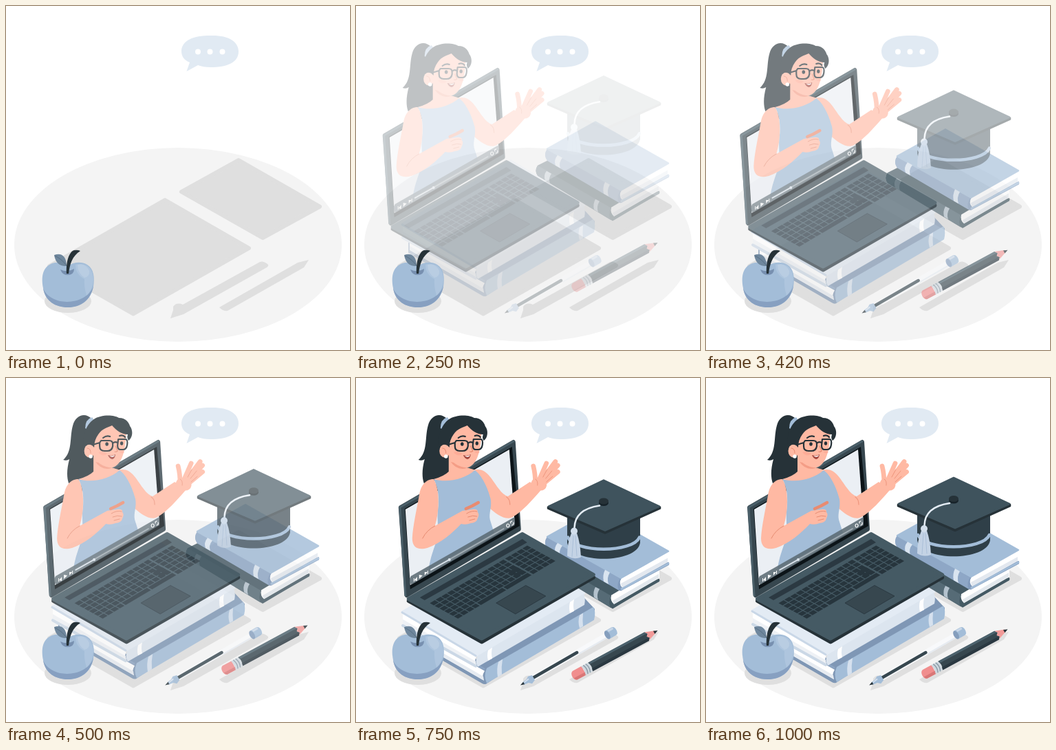
An HTML page that plays this animation: 500 px wide and 500 px high, repeating every 1.04 s.

```html
<!DOCTYPE html>
<html lang="en">
<head>
<meta charset="utf-8">
<title>Online lesson</title>
<style>
  :root { --p: 0; --shift: calc((var(--p) - 1) * 30px); }
  html, body { margin: 0; width: 100%; height: 100%; overflow: hidden; background: #fff; }
  svg { display: block; width: 100vw; height: 100vh; }
  .fromLeft, .fromTop { opacity: var(--p); }
  .fromLeft { transform: translateX(var(--shift)); }
  .fromTop { transform: translateY(var(--shift)); }
  /* solid shape with softened corners */
  .r { fill: currentColor; stroke: currentColor; stroke-width: 6; stroke-linejoin: round; }
  .thin { stroke-width: 2.5; }
  .line { fill: none; stroke-linecap: round; stroke-linejoin: round; }
</style>
</head>
<body>
<svg viewBox="0 0 500 500">
  <ellipse cx="250" cy="347" rx="238" ry="141" fill="#f4f4f4"/>

  <g id="shadows" color="#dfdfdf" fill="#dfdfdf">
    <path class="r" d="M231 282L353 352L185 447.500L63 378Z"/>
    <path class="r" d="M338 224L456 291.500L373 337L255 270Z"/>
    <path d="M239 454L243 442L243 437Q248 430 257 434L369 372Q374 370 380 375Q383 377 379 380L258 448Z"/>
    <path d="M310 438L424 373L440 369L433 380L322 443Q315 444 310 438Z"/>
    <ellipse cx="90" cy="429" rx="34" ry="17"/>
  </g>

  <g id="bubble">
    <path fill="#e1eaf3" d="M297 43C322 42 338 51 338 66C338 82 322 89 297 89C290 89 284 88 279 86L262.500 95L267 82C258 78 255 73 255 65C256 50 272 43 297 43Z"/>
    <path class="line" stroke="#fff" stroke-width="8" d="M279 66.500h0M296.500 66.500h0M314.500 66.500h0"/>
  </g>

  <g id="rightBooks" class="fromTop">
    <!-- lower book -->
    <path fill="#455a64" d="M264 253Q259 261 264 268L370 332Q373 334 376 331L441 294V290L386 300L290 240Z"/>
    <path fill="#fff" d="M371 314L386 305L441 274V289L375 327Q369 322 371 314Z"/>
    <path fill="#e3e8ed" d="M373 322L440 283V289L375 327Z"/>
    <path fill="#566b76" d="M264 253L371 315Q366 323 370 332L264 268Q259 261 264 253Z"/>
    <path fill="#b4c2cd" d="M277 261L284 265Q279 272 282 279L275 275Q272 267 277 261ZM348 302L354 305Q349 313 352 321L346 317Q344 309 348 302Z"/>
    <path class="line" stroke="#455a64" stroke-width="3" d="M373 332L440 292"/>
    <!-- upper book -->
    <path fill="#819abb" d="M278 229Q272 237 278 246L381 306Q384 309 388 306L455 270V266L400 270Z"/>
    <path fill="#fff" d="M386 289L453 252V266L387 303Q381 297 386 289Z"/>
    <path fill="#e3e8ef" d="M385 297L453 260V266L387 303Z"/>
    <path fill="#8ea7c6" d="M278 229L384 290Q378 298 382 307L278 246Q272 238 278 229Z"/>
    <path class="r thin" color="#a3bdd8" d="M278 229L348 190L454 250L385 289Z"/>
    <path fill="#d9e4f0" d="M293 238L300 242Q294 249 297 257L290 253Q287 245 293 238ZM362 277L369 281Q364 289 367 298L360 294Q358 285 362 277Z"/>
    <path class="line" stroke="#a3bdd8" stroke-width="3" d="M386 305L454 268"/>

    <g id="cap" class="fromTop">
      <path fill="#2f3f48" d="M307 195V236C312 267 408 267 413 236V195Z"/>
      <path class="line" stroke="#a3bdd8" stroke-width="4.500" d="M308 228C318 251 402 251 412 228" stroke-linecap="butt"/>
      <path class="r thin" color="#263238" d="M279 184L360 146L442 184V186L362 222L279 186Z"/>
      <path class="r thin" color="#3f535d" d="M280 183L360 145L441 183L362 218Z"/>
      <ellipse cx="360" cy="178" rx="7" ry="4.500" fill="#17232a"/>
      <ellipse cx="360" cy="175.500" rx="7" ry="4.500" fill="#263238"/>
      <path class="line" stroke="#e5edf5" stroke-width="2.500" d="M354 182C334 185 318 194 317.500 214"/>
      <path fill="#c4d3e5" d="M313 222Q307 236 307 255Q316 261 327 257Q326 236 321 222Z"/>
      <path class="line" stroke="#aabfd8" d="M316 226L314 256M319 226L321 255"/>
      <circle cx="317" cy="219" r="5" fill="#d3dfec"/>
    </g>
  </g>

  <g id="leftBooks" class="fromTop">
    <!-- lower book -->
    <path fill="#7f97b5" d="M76 356L177 408L332 318L347 334V340L189 443Q186 444 183 442L76 380Z"/>
    <path fill="#fff" d="M78 363L187 424Q182 432 186 438L78 376Z"/>
    <path fill="#e6ebf1" d="M78 370L185 432L186 438L78 376Z"/>
    <path fill="#a3bdd8" d="M190 420L345 331Q349 338 346 350L190 442Q185 431 190 420Z"/>
    <path fill="#d6e1ee" d="M207 411L213 407Q211 418 212 429L206 433Q204 421 207 411ZM325 343L330 340Q329 350 330 359L325 362Q322 352 325 343Z"/>
    <path class="line" stroke="#8ba3c1" stroke-width="3" d="M78 364L186 421"/>
    <!-- upper book -->
    <path fill="#fff" d="M68 338L176 401Q171 409 175 416L68 356Z"/>
    <path fill="#eef1f5" d="M68 349L174 410L175 416L68 356Z"/>
    <path class="line" stroke="#cbd8e6" stroke-width="4" d="M68 358L174 417"/>
    <path class="r thin" color="#e3ebf4" d="M67 338L225 246L332 311L177 402Z"/>
    <path fill="#dce5ef" d="M177 402L331 312Q334 319 332 328L177 418Q172 410 177 402Z"/>
    <path fill="#fff" d="M192 394L198 390Q196 399 198 406L192 409Q190 402 192 394ZM311 324L317 320Q315 329 317 337L311 340Q309 332 311 324Z"/>
    <path class="line" stroke="#c9d7e7" stroke-width="3" d="M67 339L174 402"/>
  </g>

  <g id="laptop" class="fromLeft">
    <!-- base -->
    <path class="r" color="#263238" d="M75 324L238 232L343 290L181 383.500Z"/>
    <path class="r" color="#455a64" d="M75 321L240 227L343 286L181 378.500Z"/>
    <path fill="#2b3942" d="M91 319L240 234L247 239L98 323Z"/>
    <path fill="#37474f" stroke="#2b3942" d="M202 327L245 301.500L274 317L230 343Z"/>
    <g id="keys" transform="matrix(.835 -.494 .7 .383 105 327)" fill="none" stroke="#27353d" stroke-width="8.400" stroke-dasharray="8.600 1.400">
      <path d="M0 5H128M0 15H128M0 25H128M0 35H128M0 45H128M0 55H38"/>
      <path d="M131 5H170M131 15H170M131 25H170M131 35H170M131 45H170M131 55H170"/>
      <path d="M40 55H84M86 55H128M113 33H128M113 43H128" stroke-dasharray="none"/>
    </g>

    <!-- screen -->
    <path class="r" color="#37474f" d="M63 188L227 93L235 220L72 316Z"/>
    <path class="line" stroke="#4b606a" stroke-width="3" d="M70 316L62 188L227 92"/>
    <path fill="#0c1418" d="M69 190L225 100L236 215L77 307Z"/>
    <path fill="#ebeff4" d="M70 191L221 104L229 212L77 301Z"/>

    <!-- teacher -->
    <g id="teacher">
      <path fill="#263238" d="M131 60C121 49 107 54 103 69C98 86 103 107 89 119Q94 121 98 118C94 133 94 144 97 153L134 143V100Q134 76 131 60Z"/>
      <path fill="#a3bdd8" d="M121 73Q121 60 131 57L134 61Q126 66 126 76Z"/>
      <path fill="#ffb9a3" d="M133 108L133 136Q126 143 111 147Q124 158 146 152Q164 147 172 134L159 130V118Z"/>
      <path fill="#f49d86" d="M136 122Q145 135 159 131V127Z"/>
      <path fill="#ffb9a3" d="M168 134C187 129 193 144 205 160Q212 170 219 172L251 151L267 163C254 178 240 194 226 202C216 208 202 198 190 187Z"/>
      <path class="line" stroke="#ee967d" stroke-width="1.200" d="M217 173Q222 176 222 184"/>
      <g class="line" stroke="#ffb9a3" stroke-width="6.800">
        <path d="M259 154Q259 140 256 128M264 149L275 124M266 151L288 121.500M268 153L291.500 127M268 156L291.500 136.500"/>
        <path d="M261 154L267 155" stroke-width="17"/>
      </g>
      <path class="line" stroke="#ee967d" d="M270 144L276 133M274 146L283 135M275 151L284 143M259 147Q263 149 262 156"/>

      <path fill="#a3bdd8" d="M111 147C131 153 156 147 171 134C181 141 190 160 194 176C196 188 191 196 193 206L199 225L104 278C107 256 113 247 116 232C119 209 115 204 118 185C119 167 116 156 111 147Z"/>
      <path class="line" stroke="#8da6c5" d="M116 232Q120 225 121 215"/>
      <path fill="#ffb9a3" d="M111 147C99 147 92 157 90 171C86 193 81 215 80 233C80 246 88 251 102 247C120 241 139 225 151 212Q158 214 165 211Q174 210 175 204Q178 198 175 195Q176 190 167 191L153 193L113 215Q118 198 118 180C118 166 116 155 111 147Z"/>
      <path class="line" stroke="#e98b70" stroke-width="4.500" d="M158 190L167 186L176 181"/>
      <path class="line" stroke="#e68c72" d="M95 233Q101 221 113 215M159 197Q167 192 174 194M161 202Q168 199 174 201M163 207L171 205"/>

      <path fill="#ffb9a3" d="M130 82C126 100 132 117 143 125Q152 131 161 130C175 125 180 105 181 74L150 64Z"/>
      <ellipse cx="127" cy="106" rx="7.500" ry="9.500" fill="#ffb9a3"/>
      <path class="line" stroke="#e68c72" d="M124 102Q129 102 129 109"/>
      <circle cx="129" cy="114" r="2.800" fill="#fff"/>
      <path fill="#ffa793" opacity=".7" d="M140 108q8 -3 13 2q-6 6 -13 -2ZM170 107q5 -2 8 0q-2 5 -8 0Z"/>
      <path fill="#263238" d="M119 100C116 78 127 59 143 56C154 53 165 55 170 58C181 58 185 66 186 70C191 76 190 87 184 91Q181 87 183 82C174 82 166 76 160 69C154 72 146 73 140 82Q134 90 134 101L131 98Q125 94 119 100Z"/>
      <g class="line" stroke="#263238" stroke-width="2.200">
        <path d="M147 87Q152 83 157 85M171 84Q176 82 179 86"/>
        <path d="M144 91H156Q161 91 161 96V99Q160 106 153 106H149Q142 106 142 99V94ZM169 89H180Q183 90 182 97Q181 104 176 104H172Q168 104 168 98ZM161 95Q164 92 168 94M142 94L132 97"/>
      </g>
      <ellipse cx="152.500" cy="96" rx="2.300" ry="2.800" fill="#263238"/>
      <ellipse cx="174" cy="95" rx="2.200" ry="2.800" fill="#263238"/>
      <path class="line" stroke="#e68c72" stroke-width="1.300" d="M165 99L168 106Q166 108 164 107"/>
      <path fill="#a3483f" d="M154 112Q160 114 165 111Q164 118 160 118Q156 117 154 112Z"/>
      <path fill="#fff" d="M156 113Q160 114 164 112L163 114Q159 116 156 113Z"/>
    </g>

    <!-- player bar -->
    <path fill="#5a6973" opacity=".86" d="M78 288L227 203Q229 202 229 205V214L79 300Q76 300 76 292Z"/>
    <path class="line" stroke="#a4b0b8" stroke-width="1.500" d="M107 279L213 219"/>
    <path class="line" stroke="#dce5ee" stroke-width="1.500" d="M107 279L134 264"/>
    <circle cx="134" cy="264" r="2" fill="#dce5ee"/>
    <path fill="#fff" d="M87 289V295L83 294ZM82 291h1v5h-1ZM90 286L95 287L90 292ZM98 282L102 282L98 287ZM102 280h1v5h-1Z"/>
    <path class="line" stroke="#fff" stroke-width="1.200" d="M219 212a2 2.500 0 1 0 .1 0M223 211V209L225 208M227 210V213L225 214"/>
  </g>

  <g id="pen" class="fromLeft">
    <g transform="translate(238 446) rotate(-30)">
      <rect x="20" y="-4" width="126" height="8" fill="#f8f9fb"/>
      <path fill="#e6ebf1" d="M95 2H145V4H95Z"/>
      <path class="line" stroke="#37474f" stroke-width="4.500" d="M20 0H94"/>
      <path fill="#a3bdd8" d="M4 -2L11 -3L15 -5.500L21 -4V4L15 6.500L11 3L4 2Z"/>
      <path fill="#d6e1ee" d="M6 -1.500L14 -3V-1L6 0Z"/>
      <path fill="#263238" d="M-1 0L5 -2V2Z"/>
      <path fill="#a3bdd8" d="M145 -6.500H156Q160 -6 160 0T156 6.500H145Q141 0 145 -6.500Z"/>
      <ellipse cx="145" cy="0" rx="3.500" ry="6.500" fill="#859ebd"/>
      <path fill="#c9d7e8" d="M148 -6H157V-3H149Z"/>
    </g>
  </g>

  <g id="pencil" class="fromTop">
    <g transform="translate(318 430.500) rotate(-28.400) scale(1 .95)">
      <path fill="#f08e8e" d="M15 -7.500H0Q-4 -6 -4 0T0 7.500H15Z"/>
      <path fill="#d97777" d="M15 3H-3Q-2 7 0 7.500H15Z"/>
      <path fill="#cfd8df" d="M14 -7.500H27V7.500H14Q17 0 14 -7.500Z"/>
      <path class="line" stroke="#8e9ea9" stroke-width="1.500" d="M18 -7Q21 0 18 7M22 -7Q25 0 22 7"/>
      <path fill="#37474f" d="M26 -7.500H119L122 -3L119 0L122 4L119 7H26Q29 0 26 -7.500Z"/>
      <path fill="#2a3841" d="M27 3H121L119 7.500H26Z"/>
      <path fill="#4c626d" d="M26 -7.500H119L121 -4H27Z"/>
      <path fill="#f19a98" d="M119 -7.500L133 -2V1.500L119 7L122 4L119 0L122 -3Z"/>
      <path fill="#263238" d="M131 -2.700L137 0L131 2.500Z"/>
    </g>
  </g>

  <g id="apple">
    <path fill="#a3bdd8" d="M90 378C98 372 110 371 118 376C128 382 129 395 127 408C123 429 107 438 90 438C72 438 57 429 54 410C51 394 53 381 65 375C73 371 83 374 90 378Z"/>
    <path fill="#87a0c1" d="M54 410C64 437 116 437 127 407C123 429 107 438 90 438C72 438 57 429 54 410Z"/>
    <path fill="#aec5de" d="M101 376C116 372 127 381 127 398Q126 413 117 421Q113 407 114 397Q101 390 101 376Z"/>
    <path fill="#bdd0e4" opacity=".7" d="M104 376Q116 373 121 385Q122 393 114 395Q104 388 104 376Z"/>
    <path fill="#7890b0" d="M79 383Q89 388 99 382Q99 391 89 391Q82 391 79 383Z"/>
    <path fill="#6f879d" d="M70 362C80 358 88 363 88 378Q73 379 70 362Z"/>
    <path class="line" stroke="#566e83" d="M71 363Q80 367 88 377"/>
    <path fill="#263238" d="M88 389C87 371 92 357 99 355Q104 354 108 356C96 364 93 374 91 389Z"/>
  </g>
</svg>

<script>
  const LOOP = 1040, FPS = 24, LEAD = 0.033;
  const bez = (s, a, b) => 3 * (1 - s) ** 2 * s * a + 3 * (1 - s) * s * s * b + s ** 3;

  // cubic-bezier(.36, -.01, .5, 1.38), solved by bisection
  function ease(x) {
    let lo = 0, hi = 1;
    for (let i = 0; i < 24; i++) {
      const mid = (lo + hi) / 2;
      if (bez(mid, 0.36, 0.5) < x) lo = mid; else hi = mid;
    }
    return bez(lo, -0.01, 1.38);
  }

  // The motion runs in hard steps, 24 per second
  function draw() {
    const step = Math.floor((performance.now() % LOOP + 5) * FPS / 1000);
    const p = step < 2 ? 0 : ease(Math.min(1, step / FPS + LEAD));
    document.documentElement.style.setProperty('--p', p.toFixed(4));
    requestAnimationFrame(draw);
  }
  draw();
</script>
</body>
</html>
```
